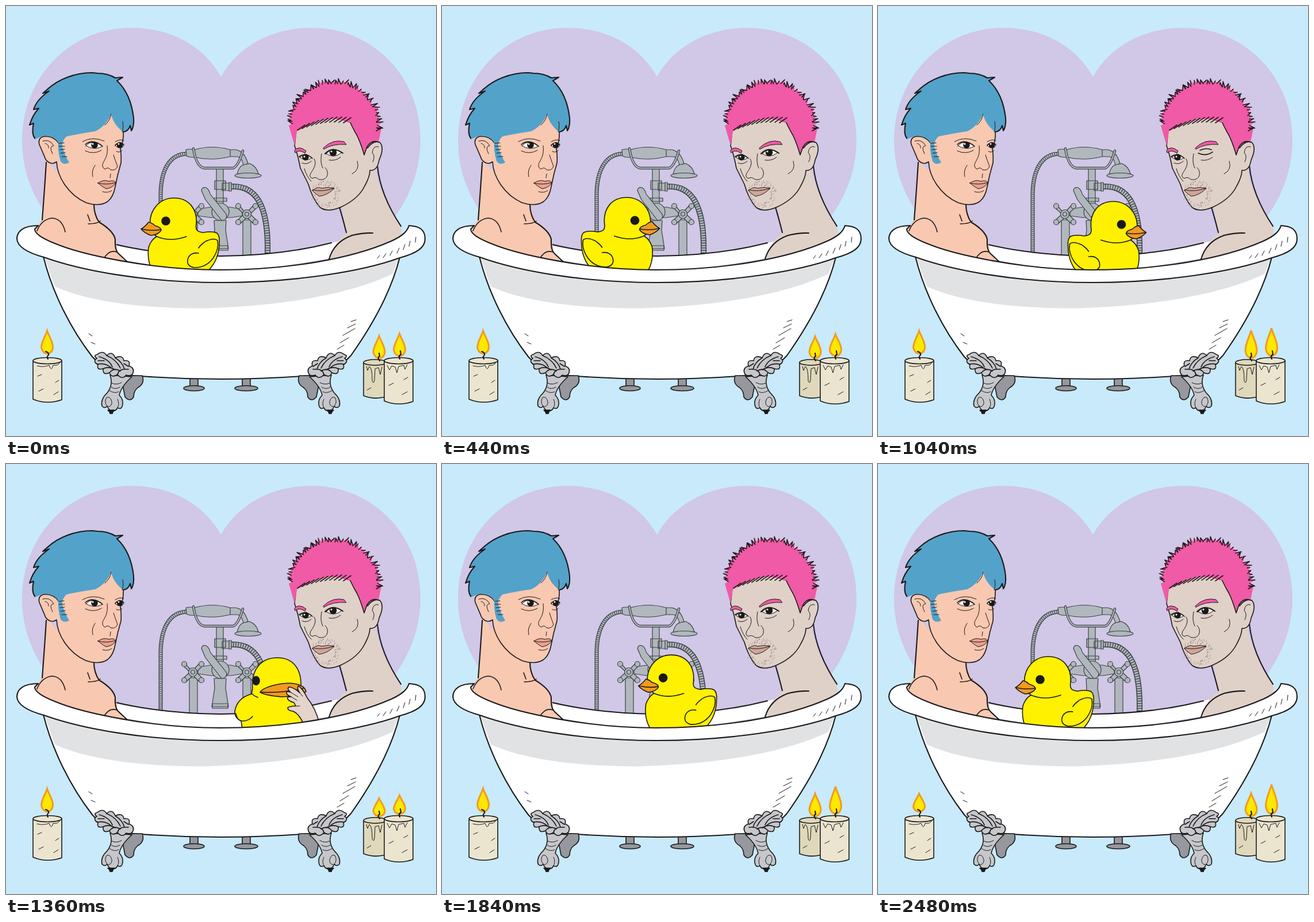
Recreate the animation shown at these times as an HTML page. Size 748x748 px, loop 2.52 s.

```html
<!DOCTYPE html>
<html lang="en">
<head>
<meta charset="utf-8">
<title>Bath duck</title>
<style>
html, body { margin: 0; height: 100%; overflow: hidden; background: #c8eafb; }
svg { display: block; width: 100vw; height: 100vh; fill: none; stroke: #1b191a; stroke-width: 1.6; stroke-linecap: round; stroke-linejoin: round; }
.plain { stroke: none; }
.thin { stroke-width: 1; }
.bold { stroke-width: 2.1; }
.white { fill: #fff; }
.ink { fill: #1b191a; }
.metal { fill: #b0b8bd; stroke: #3c4144; stroke-width: 1.2; }
.claw { fill: #c6c7cb; }
.dim { fill: #96989e; }
.peach { fill: #f9c8b0; }
.pale { fill: #dfd1c8; }
.blue { fill: #53a2c9; }
.pink { fill: #f05aa6; }
.duck { fill: #fff100; }
.beak { fill: #f29a1f; }
.wax { fill: #ebe5d0; }
.flame { fill: #ffe800; stroke: #f49a1d; stroke-width: 3; stroke-linejoin: miter; vector-effect: non-scaling-stroke; }
</style>
</head>
<body>
<svg viewBox="0 0 748 748">
<defs>
  <g id="tap">
    <path class="metal" d="M-4 -4L-15 -17L-18 -12L-5 0L-18 12L-13 18L0 6L13 18L18 12L6 0L18 -12L13 -17L2 -5Z"/>
    <g class="metal"><circle cx="-15" cy="-14" r="4.5"/><circle cx="15" cy="-14" r="4.5"/><circle cx="-15" cy="14" r="4.5"/><circle cx="15" cy="14" r="4.5"/><circle r="7.5"/><circle r="3.5"/></g>
  </g>
  <g id="foot">
    <path class="dim" d="M200 643L237 643Q242 657 229 664Q222 670 222 680Q216 690 207 680Z"/>
    <path class="claw" d="M181 642Q187 659 176 673Q164 684 167 696Q172 701 176 696Q180 706 186 703Q190 706 194 699Q202 703 203 692Q204 684 197 677Q200 662 219 645Z"/>
    <path class="ink" d="M177 703L189 703L186 706L185 709L181 709L180 706Z"/>
    <path class="thin" d="M184 656Q192 660 201 655M183 663Q190 668 198 663M180 669Q189 675 196 671M176 696Q170 689 175 681Q181 678 184 688Q185 696 178 697M194 699Q198 692 194 684"/>
    <path class="claw" d="M159 606Q169 598 175 608Q185 599 190 612Q203 606 205 617Q217 615 214 626Q224 630 221 638Q219 645 209 642Q202 651 194 641Q184 648 180 638Q168 643 169 631Q157 634 160 624Q150 618 158 613Q151 608 159 606Z"/>
    <path d="M162 610Q180 615 185 628M175 608Q192 615 199 630M190 612Q203 620 206 632M159 623Q174 620 185 631M169 631Q179 626 190 633M180 638Q188 628 199 635M194 641Q196 630 213 632M160 617L171 617M205 622L213 627"/>
  </g>
  <g id="sideDuck">
    <path class="duck" d="M251 386C247 352 270 334 292 334C319 334 333 354 331 379C329 390 333 393 343 394Q359 391 367 395Q372 400 371 411Q371 442 351 461H255Q245 444 248 420Q252 407 262 401Q254 395 251 386Z"/>
    <path d="M262 401Q286 411 314 401M346 410Q362 402 368 408Q371 423 360 439Q347 456 327 455Q312 452 317 438Q322 428 335 430M345 411Q338 416 335 421"/>
    <path class="beak" d="M235 388Q243 383 248 376Q254 377 259 382Q270 385 270 390Q265 398 252 399Q241 395 235 388Z"/>
    <path d="M236 388Q254 392 269 389"/>
    <circle class="ink" cx="278" cy="374" r="7"/>
  </g>
  <g id="frontDuck">
    <path class="duck" d="M429 390C426 356 445 337 472 337C500 337 514 357 513 386Q522 424 515 461H411L409 447Q397 442 398 430Q402 407 427 400Z"/>
    <path d="M400 434Q402 448 414 447Q423 446 429 439M427 399Q432 404 438 406"/>
    <path class="beak" d="M442 397Q447 389 470 384Q496 378 512 385Q521 389 522 396Q505 404 480 405Q452 403 442 397Z"/>
    <path d="M443 397Q480 399 518 390"/>
    <ellipse class="ink" cx="435" cy="377" rx="6" ry="7.5"/>
  </g>
  <g id="arm">
    <path d="M545 450Q538 424 524 407Q517 392 509 386Q505 389 511 398Q500 388 492 388Q488 391 495 397Q487 394 488 399Q489 402 496 405Q488 404 490 409Q493 413 501 415L504 421Q494 421 490 424Q490 429 499 430Q510 434 519 455Z"/>
    <path class="thin" fill="none" d="M495 397L508 405M496 405L506 411M511 398L516 404M504 421L511 421"/>
  </g>
  <path id="flameShape" class="flame" d="M0 -41C3 -31 10.500 -22 10 -11Q9 -2 1 0Q-8 -1 -10 -11C-10 -22 -3 -31 0 -41Z"/>
</defs>

<path class="plain" fill="#d1c7e6" d="M374 123C342 66 282 38 218 38C110 38 28 125 28 235C28 330 90 400 160 450H590C660 400 721 330 721 232C721 125 640 38 532 38C468 38 406 66 374 123Z"/>

<g id="shower">
  <g stroke="#3c4144"><path stroke-width="7" d="M314 257C284 258 269 286 269 330V428"/><path stroke="#b0b8bd" stroke-width="4.500" stroke-linecap="butt" stroke-dasharray="2.600 1" d="M314 257C284 258 269 286 269 330V428"/></g>
  <g stroke="#3c4144"><path stroke-width="10" d="M392 314C432 312 457 342 455 430"/><path stroke="#b0b8bd" stroke-width="7" stroke-linecap="butt" stroke-dasharray="3 1.300" d="M392 314C432 312 457 342 455 430"/></g>
  <g class="metal">
    <path d="M319 372H333V436H319ZM412 372H426V436H412Z"/>
    <path d="M366 282H378V345H366ZM363 304H382V319H363ZM376 308H388V321H376ZM388 307H392V322H388ZM362 334H384V340H362Z"/>
    <path d="M334 353L356 350H391L411 354V365L391 368H356L334 365Z"/>
    <path d="M362 373H383L382 390L387 422H358L363 390ZM359 417H386V425H359Z"/>
    <circle cx="373" cy="358" r="15"/>
    <path d="M340 321Q341 314 348 316Q354 320 355 327L383 362Q386 372 375 373L347 337Z"/>
    <path d="M313 250Q321 248 328 250V263Q320 264 314 261ZM328 250Q358 241 390 250V262Q358 270 328 263ZM390 250H400Q415 253 421 274L413 277Q410 262 401 262H390Z"/>
    <path d="M402 293Q405 278 414 276L424 274Q436 279 439 292Z"/>
    <ellipse cx="421" cy="295" rx="23" ry="4.500"/>
  </g>
  <path stroke="#3c4144" stroke-width="4.500" d="M326 248Q331 280 345 282H395Q404 279 412 252"/>
  <path stroke="#b0b8bd" stroke-width="2.200" d="M326 248Q331 280 345 282H395Q404 279 412 252"/>
  <use href="#tap" x="325" y="362"/><use href="#tap" x="419" y="362"/>
</g>

<path class="plain white" d="M90 392C190 420 270 435 374 435C470 435 560 416 655 390L680 420L374 470L70 420Z"/>
<path class="bold" d="M188 414Q270 434 374 435Q480 434 566 412"/>

<g id="leftMan">
  <path class="plain peach" d="M70 268L63 372Q54 380 51 394L66 414L215 455L193 427Q193 404 180 390Q163 378 156 360L153 344L100 300Z"/>
  <path class="bold" d="M70 272Q67 320 63 372M153 345Q153 363 162 376Q187 391 190 406Q189 425 196 431L212 446"/>
  <path d="M54 391Q62 371 80 369Q98 370 103 393M142 363L146 374M143 379Q158 379 164 374M170 440Q179 423 193 428"/>
  <path class="peach" d="M91 238Q82 225 65 227Q55 230 58 241Q65 257 69 267Q78 278 88 271C89 297 108 328 139 342Q163 350 177 340Q187 332 190 314Q194 293 200 273Q201 260 199 249Q205 235 204 216L180 178L96 210Z"/>
  <path class="thin" d="M64 235Q76 231 83 243Q74 244 81 257M68 239Q75 241 74 247"/>
  <path class="plain blue" d="M64 152L73 144C91 128 119 116 150 116L159 117Q177 117 190 125L203 124L193 130C209 145 219 168 222 195Q223 210 218 217L216 208Q213 218 204 219Q187 207 183 188Q174 209 155 218Q127 222 105 227Q97 235 98 245Q103 262 110 272Q101 278 95 270Q90 255 91 238Q84 225 64 226L50 232Q44 222 48 204L41 207Q46 190 57 178L48 180Q53 163 75 148Z"/>
  <path class="bold" d="M50 230Q44 222 48 204L41 207Q46 190 57 178L48 180Q53 163 75 148L64 152L73 144C91 128 119 116 150 116L159 117Q177 117 190 125L203 124L193 130C209 145 219 168 222 195Q223 210 218 217L216 208Q213 218 204 219"/>
  <path class="thin" d="M183 188Q181 200 172 207M203 201Q205 212 202 219M92 239L101 238M92 244L102 244M94 250L102 249M95 256L103 255M97 262L106 262"/>
  <path class="thin" d="M133 236Q150 226 171 235M190 236Q199 231 205 234"/>
  <g id="leftOpen">
    <path class="white thin" d="M139 243Q151 230 168 244Q153 252 139 243ZM190 243Q198 233 205 243Q199 251 190 243Z"/>
    <circle class="ink" cx="154" cy="242" r="5"/><circle class="ink" cx="198" cy="242" r="4.5"/>
    <path d="M138 241Q151 230 168 244M190 242Q198 234 205 241"/>
    <g class="plain white"><circle cx="151" cy="240" r="1.600"/><circle cx="196" cy="240" r="1.400"/></g>
  </g>
  <g id="leftWink">
    <path class="white thin" d="M190 243Q198 233 205 243Q199 251 190 243Z"/>
    <circle class="ink" cx="198" cy="242" r="4.500"/>
    <path d="M138 241Q152 252 168 245M190 242Q198 234 205 241"/>
  </g>
  <path class="thin" d="M138 252Q152 259 166 251M192 253Q198 256 202 251M176 243Q178 258 171 269Q164 279 172 284Q178 279 182 285Q191 287 194 279Q190 269 187 259M155 277Q148 287 151 297M182 292L181 299M168 323Q177 326 184 321"/>
  <path class="thin" fill="#e9a18d" d="M160 308Q170 301 179 305Q187 302 191 307Q187 316 174 318Q167 314 160 308Z"/>
  <path class="thin" d="M160 308Q175 312 191 307"/>
</g>

<g id="rightMan">
  <path class="plain pale" d="M562 445Q569 411 592 396L583 343L640 275Q652 336 687 381L690 410L580 455Z"/>
  <path class="bold" d="M646 278Q651 329 687 383M580 350Q586 370 592 394M562 440Q571 410 602 399Q623 394 638 395"/>
  <path class="pale" d="M505 216L502 243Q508 260 512 282L526 310Q533 335 546 350Q559 360 582 350Q613 336 624 313Q633 297 633 286Q646 287 649 268Q659 246 650 237Q639 233 629 247L601 203L560 190Z"/>
  <path class="thin" d="M648 245Q639 242 637 255Q643 261 638 271M602 292Q616 285 611 270M519 283Q523 297 531 305"/>
  <path id="pinkHair" class="plain pink"/>
  <path id="spikes"/>
  <path d="M648 237Q636 232 628 245L623 259Q617 238 610 224Q605 216 599 203"/>
  <path id="fringe"/>
  <path class="pink thin" d="M502 251Q509 242 522 252L520 256Q510 249 503 255ZM552 247Q568 231 588 236L592 241Q569 239 553 249Z"/>
  <path class="white thin" d="M511 263Q521 255 532 264Q522 272 511 263Z"/>
  <circle class="ink" cx="521" cy="263" r="5"/><circle class="plain white" cx="519" cy="262" r="1.500"/>
  <path d="M510 262Q521 254 533 265"/>
  <g id="rightOpen">
    <path class="white thin" d="M557 257Q568 244 584 255Q570 266 557 257Z"/>
    <circle class="ink" cx="569" cy="255" r="5.500"/><circle class="plain white" cx="566" cy="253" r="1.600"/>
    <path class="bold" d="M555 257Q568 243 586 256"/>
  </g>
  <path id="rightWink" d="M557 256Q570 262 582 254M560 251Q570 246 580 250"/>
  <path class="thin" d="M515 273Q523 277 531 270M562 268Q573 270 582 263M536 266Q541 273 534 285Q524 297 533 300Q538 296 545 302Q554 303 558 297Q562 288 555 281M549 257Q546 272 551 282"/>
  <path id="stubble" stroke="#9b8d88" stroke-width=".8"/>
  <path class="thin" fill="#cfa59a" d="M533 321Q542 313 549 317Q560 314 571 317Q560 329 545 331Q538 327 533 321Z"/>
  <path class="thin" d="M534 320Q550 324 571 317"/>
</g>

<use id="side" href="#sideDuck"/>
<use id="front" href="#frontDuck"/>
<use id="leftArm" class="peach" href="#arm"/>
<use id="rightArm" fill="#e5d4c9" href="#arm"/>

<g class="dim">
  <path d="M320 645H334V663H320ZM411 645H425V663H411Z"/>
  <ellipse cx="327" cy="665" rx="18" ry="4.500"/><ellipse cx="418" cy="665" rx="20" ry="4.500"/>
</g>
<path class="plain white" d="M65 436C81 500 113 562 150 610Q176 640 222 643Q374 655 526 643Q575 637 600 608C639 553 671 493 685 437L374 470Z"/>
<path class="plain" fill="#e1e2e4" d="M67 438L85 488C150 517 250 526 340 526C460 523 589 506 672 466L684 438L374 470Z"/>
<path class="bold" d="M65 436C81 500 113 562 150 610Q176 640 222 643Q374 655 526 643Q575 637 600 608C639 553 671 493 685 437"/>
<path class="bold white" d="M56 382C30 382 19 392 19 405C20 420 40 430 66 437C130 460 240 481 374 481C500 481 620 462 685 438C715 430 729 420 729 405C729 388 718 383 701 382C698 392 690 400 670 409C600 440 490 459 372 459C250 459 130 432 85 413C62 404 50 396 50 388Z"/>
<path class="thin" d="M646 439L650 434M656 438L661 431M668 434L672 426M680 430L684 421M691 424L694 415M701 418L703 409M712 411L713 402M600 549L609 546M594 560L608 553M586 573L607 561M581 586L596 577M576 597L588 590M144 570L150 574M148 585L155 588"/>
<use href="#foot"/><use href="#foot" transform="translate(747)scale(-1 1)"/>

<g id="candles">
  <path class="wax" d="M47 618V684Q71 694 97 685V617Z"/>
  <ellipse class="wax" cx="72" cy="617" rx="25" ry="5.500"/>
  <g fill="#dfd8bb"><path d="M622 620V678Q640 685 660 680V620Z"/><ellipse cx="642" cy="620" rx="20" ry="5"/></g>
  <path class="wax" d="M658 618V687Q682 697 708 688V617Z"/>
  <ellipse class="wax" cx="683" cy="617" rx="25" ry="5.500"/>
  <path class="thin" d="M54 626Q65 629 75 625Q79 637 82 625Q91 626 93 621M627 627L629 634L632 627Q637 629 637 652Q640 659 641 650L642 631L648 629L651 641L654 628M663 625L667 633L671 626L677 628L680 638L683 627L692 625L694 632L698 624M55 644L62 641M57 670L65 666M83 676L91 671M86 655L92 651M666 660L674 656M689 676L698 671M692 650L699 646M628 668L635 664"/>
</g>
<use href="#flameShape" id="flame0"/><use href="#flameShape" id="flame1"/><use href="#flameShape" id="flame2"/>
<path class="bold" d="M73 614Q70 610 74 607Q75 603 69 601M650 617Q645 612 650 609L649 604M685 614Q682 609 687 606L686 600"/>
</svg>
<script>
const LOOP = 2520, STEP = 40;
const $ = id => document.getElementById(id);
const place = (id, value) => $(id).setAttribute('transform', value);
const show = (id, on) => $(id).style.display = on ? '' : 'none';

let seed = 7;
const random = () => (seed = seed * 16807 % 2147483647) / 2147483647;

function drawHair() {
  const point = (a, r) => `${571 + 81 * r * Math.cos(a)} ${207 + 79 * r * Math.sin(a)}`;
  let outline = '', spikes = '';
  for (let i = 0; i < 44; i++) {
    const a = Math.PI * (1.01 + i / 44 * 1.04);
    const root = point(a, 0.9 + random() * 0.05);
    const tip = point(a + (random() - 0.3) * 0.1, 0.98 + random() * 0.07);
    outline += `L${root}L${tip}`;
    spikes += `M${root}L${tip}`;
    if (random() < 0.6) spikes += `L${point(a + 0.06, 0.91)}`;
  }
  $('pinkHair').setAttribute('d', `M502 243L492 208${outline}L648 237Q636 232 628 245L623 259Q617 238 610 224Q605 216 599 203Q567 190 537 203L506 218Z`);
  $('spikes').setAttribute('d', spikes);
  let fringe = '';
  for (let i = 0; i < 11; i++) {
    const x = 507 + i * 8, y = 216 - 14 * Math.sin(i / 5);
    fringe += `M${x} ${y}L${x + 13} ${y - 9}`;
  }
  $('fringe').setAttribute('d', fringe);
}

function drawStubble() {
  let d = '';
  for (let i = 0; i < 110; i++) {
    const a = random() * 2 * Math.PI, r = 0.62 + random() * 0.38;
    d += `M${556 + 27 * r * Math.cos(a)} ${327 + 24 * r * Math.sin(a)}l-.6 1.5`;
  }
  $('stubble').setAttribute('d', d);
}

// Linear value between [time, value] keys.
function along(keys, t) {
  const i = Math.max(1, keys.findIndex(k => k[0] >= t));
  const [t0, a] = keys[i - 1], [t1, b] = keys[i];
  return a + (b - a) * (t - t0) / (t1 - t0);
}

const duckX = [[0, 307], [80, 293], [200, 290], [320, 289], [440, 306.5], [1040, 394.5], [1280, 432], [1360, 457], [1560, 458], [1640, 445], [2080, 376], [2480, 311], [2520, 307]];
const duckY = [[0, 0], [100, 0], [320, -4], [440, -1], [1040, 6], [1360, 0], [1640, -1], [2080, -3], [2480, 1], [2520, 0]];
const times = [0, 440, 1040, 1360, 1640, 2080, 2480, LOOP];
const flames = [
  { x: 71.5, y: 605, heights: [42, 42, 42, 42, 39, 47, 33, 42] },
  { x: 649, y: 613, heights: [41, 40, 51, 33, 41, 42, 42, 41] },
  { x: 684.5, y: 609, heights: [41, 40, 51, 34, 51, 49, 54, 41] }
].map(f => ({ ...f, keys: f.heights.map((h, i) => [times[i], h]) }));

function moveArm(id, t, start, mirror) {
  const u = t - start;
  show(id, u >= 0 && u < 260);
  const out = Math.max(0, 1 - u / 80, (u - 140) / 120);
  place(id, `${mirror ? 'translate(748)scale(-1 1)' : ''}translate(${out * 25} ${out * 55})`);
}

function render(t) {
  const x = along(duckX, t), y = along(duckY, t);
  const turning = t >= 80 && t < 320 || t >= 1300 && t < 1560;
  const right = t >= 200 && t < 1440;
  const pose = (center, flip) => `translate(${flip ? x + center : x - center} ${y})scale(${flip ? -1 : 1} 1)`;
  place('side', pose(307, right));
  place('front', pose(457, !right));
  show('side', !turning);
  show('front', turning);
  moveArm('leftArm', t, 20, true);
  moveArm('rightArm', t, 1280, false);

  const leftWink = t >= 2120 && t < 2240, rightWink = t >= 960 && t < 1120;
  show('leftOpen', !leftWink);
  show('leftWink', leftWink);
  show('rightOpen', !rightWink);
  show('rightWink', rightWink);

  flames.forEach((f, i) => place('flame' + i, `translate(${f.x} ${f.y})scale(1 ${along(f.keys, t) / 43})`));
}

function tick() {
  render(Math.floor(performance.now() % LOOP / STEP) * STEP);
  requestAnimationFrame(tick);
}

drawHair();
drawStubble();
tick();
</script>
</body>
</html>
```
